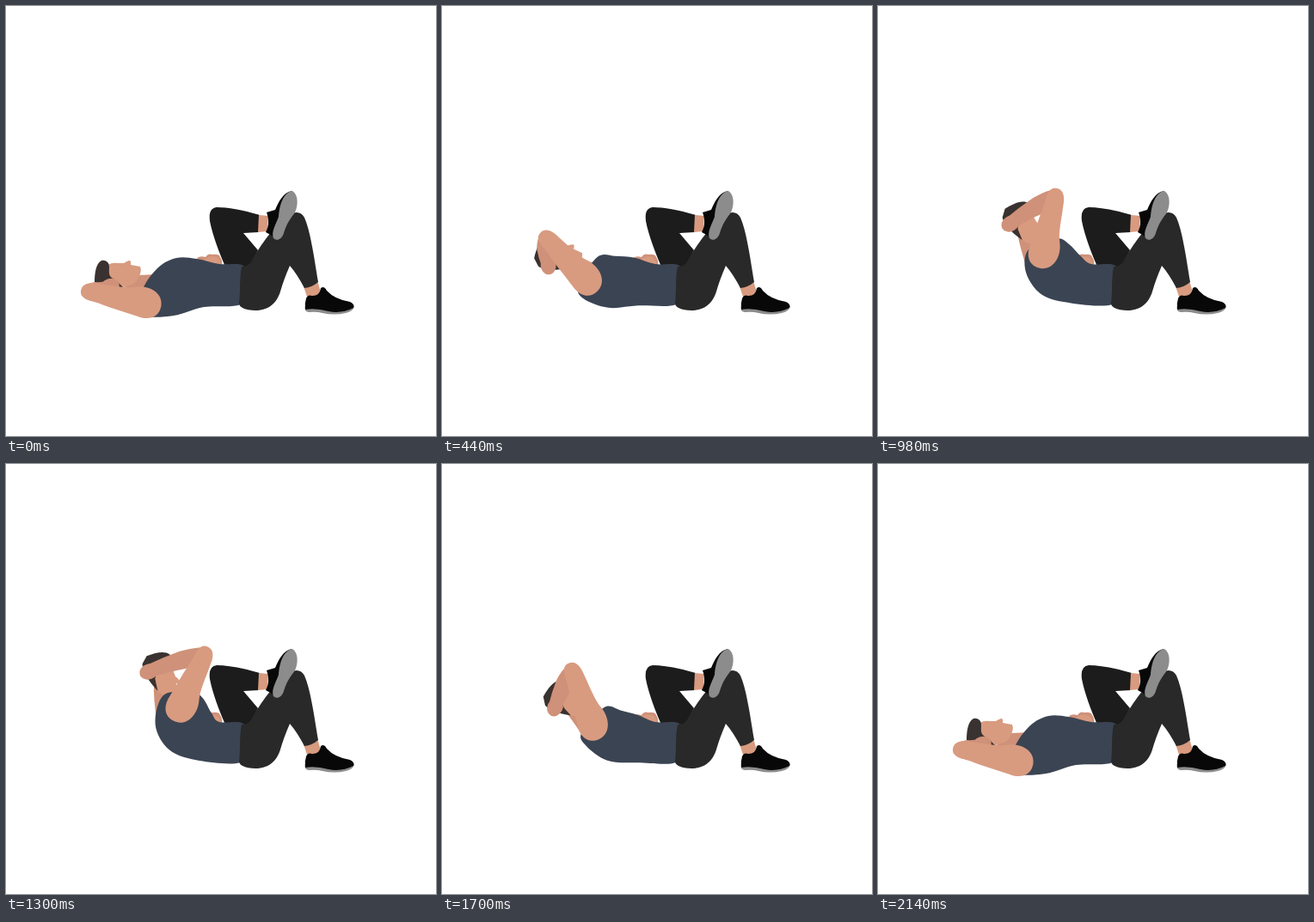
Animation, 500 px wide and 500 px high, one loop 2300 ms. Source, as an HTML page:

```html
<!DOCTYPE html>
<html lang="en">
<head>
<meta charset="utf-8">
<title>Crossed-leg crunch</title>
<style>
  html, body { margin: 0; width: 100%; height: 100%; overflow: hidden; background: #fff; }
  svg { display: block; width: 100vw; height: 100vh; }
  .skin { fill: #d89b80; }
  .shade { fill: #cf9179; }
  .hair { fill: #393230; }
  .top { fill: #3b4452; }
  .far { fill: #1c1c1c; }
  .near { fill: #292929; }
  .shoe { fill: #080808; }
  .sole { fill: #8c8c8c; }
</style>
</head>
<body>
<svg viewBox="0 0 500 500">
  <!-- resting hand and crossed leg -->
  <path class="shade" d="M222 293Q226 290 232 292Q235 287 240 289Q248 288 249 292Q252 296 251 301L228 300Z"/>
  <path class="skin" d="M231 295Q236 290 242 292Q248 292 250 301L234 301Z"/>
  <path class="far" d="M255 303C248 287 240 266 237 250Q235 235 245 234Q264 234 295 243L294 263L276 264L293 284L283 304Z"/>

  <path class="shade" id="neck"/>
  <g id="head">
    <path class="skin" d="M-10 -9Q-4 -12 2 -11L9 -11Q12 -13 15 -14Q18 -14 17 -9L28 -7Q30 -2 27 4Q24 12 18 14L5 18L-10 12Z"/>
    <path class="hair" id="hair"/>
  </g>
  <path class="top" id="torso"/>

  <!-- supporting leg -->
  <path class="skin" d="M346 326L362 319L366 333Q360 339 350 338Z"/>
  <path class="near" d="M274 303C281 303 284 300 287 294C296 278 312 256 325 246C334 238 343 238 347 246C354 262 358 290 363 321Q356 327 347 328Q338 311 330 302Q323 318 319 332C314 348 303 354 290 354C278 354 271 350 271 346C273 330 271 318 274 303Z"/>
  <path class="sole" d="M348 348Q346 355 352 356Q361 355 368 357Q382 360 395 357Q404 355 405 349Z"/>
  <path class="shoe" d="M349 340Q351 335 356 337Q365 337 366 328Q370 325 373 331Q382 341 400 344Q406 347 404 351Q390 358 375 355Q360 351 348 353Q347 346 349 340Z"/>

  <!-- raised foot -->
  <path class="skin" d="M294 243L305 244L304 262L293 263Z"/>
  <path class="shoe" d="M303 240L313 237C317 228 322 217 332 215C328 235 320 250 311 268L302 263C306 256 306 248 303 240Z"/>
  <path class="sole" d="M333 215C340 219 340 232 336 240C330 248 326 254 323 264C321 271 315 274 311 270C308 262 314 254 317 245C318 232 322 217 333 215Z"/>

  <g id="forearm" class="shade">
    <path id="muscle"/>
    <ellipse id="hand" rx="11" ry="9"/>
  </g>
  <path class="skin" id="arm" d="M0 2C0 -6 8 -9 18 -9C36 -10 50 -9 62 -13C78 -18 95 -11 95 4C95 16 86 22 74 21C56 18 40 17 22 13C6 12 0 10 0 2Z"/>
</svg>
<script>
const LOOP = 2300, START = 160, PEAK = 1207, END = 2140, STEP = 20;
const DEG = Math.PI / 180;
const part = id => document.getElementById(id);

// 0 lying flat, about 1 fully curled
function curlAt(t) {
  if (t <= START || t >= END) return 0;
  const x = t < PEAK
    ? (t - START) / (PEAK - START)
    : 1 - ((t - PEAK) / (END - PEAK)) ** 1.17;
  return 1.04 * x + 0.05 * Math.sin(2 * Math.PI * x) ** 2;
}

// A point in the axes of a part, seen on the stage
function place([px, py], [x, y], deg) {
  const c = Math.cos(deg * DEG), s = Math.sin(deg * DEG);
  return [x + px * c - py * s, y + px * s + py * c];
}

const pose = (el, [x, y], deg) =>
  el.setAttribute('transform', `translate(${x} ${y}) rotate(${deg})`);

// Closed smooth curve through points
function smooth(pts) {
  const n = pts.length, at = i => pts[(i + n) % n];
  return pts.reduce((d, b, i) => {
    const a = at(i - 1), c = at(i + 1), e = at(i + 2);
    const p = b.map((v, k) => v + (c[k] - a[k]) / 6);
    const q = c.map((v, k) => v - (e[k] - b[k]) / 6);
    return `${d}C${p} ${q} ${c}`;
  }, `M${pts[0]}`) + 'Z';
}

function draw(t) {
  const q = curlAt(t), q2 = q * q;

  const tilt = 72 * q ** 1.5;
  const head = [128 + 58 * q2, 310 - 69 * q];
  const inHead = (x, y) => place([x, y], head, tilt);
  pose(part('head'), head, tilt);
  // More of the back of the head shows as it turns away
  part('hair').setAttribute('d',
    `M-25 12C-25 2 -24 -10 -17 -14C-12 -15 -8 -12 -8 -7C-8 -1 -9 3 -5 6L3 12L${8 + 10 * q} ${17 - 3 * q}Q-6 24 -18 20Z`);

  const back = [160 + 14 * q, 359 - 57 * q];
  part('torso').setAttribute('d', smooth([
    [272, 347], [274, 325], [276, 302], [248, 300],
    [222 + 18 * q2, 294 - 4 * q],
    [198 + 32 * q2, 293 - 22 * q2],
    [176 + 42 * q2, 305 - 40 * q],
    [158 + 27 * q ** 3, 332 - 66 * q2],
    back,
    [195 - 5 * q, 360 - 28 * q],
    [230 - 5 * q, 350 - 5 * q]
  ]));

  const collar = [176 + 29 * q2, 312 - 42 * q];
  part('neck').setAttribute('d',
    `M${inHead(26, 3)}L${inHead(7, 15)}Q${inHead(24, 22)} ${back[0] + 2},${back[1] - 2}L${collar}Z`);

  const swing = 10 + 105 * q;
  const shoulder = [186 + 16 * q ** 6, 346 - 47 * q];
  const elbow = place([6 * q - 100, 0], shoulder, swing);
  pose(part('arm'), elbow, swing);

  // The hand stays on the back of the head
  const joint = place([10, 2], elbow, swing), hand = inHead(-7, 16);
  const dx = hand[0] - joint[0], dy = hand[1] - joint[1], len = Math.hypot(dx, dy);
  pose(part('forearm'), joint, Math.atan2(dy, dx) / DEG);
  part('muscle').setAttribute('d',
    `M-9 0C-9 10 ${len * 0.2} 12 ${len * 0.4} 12Q${len * 0.7} 11 ${len} 8V-7Q${len * 0.6} -7 ${len * 0.4} -9C${len * 0.2} -10 -9 -10 -9 0Z`);
  part('hand').setAttribute('cx', len);
}

const begin = performance.now();
function tick() {
  const t = Math.max(0, performance.now() - begin) % LOOP;
  draw(Math.floor(t / STEP) * STEP);
  requestAnimationFrame(tick);
}
tick();
</script>
</body>
</html>
```
